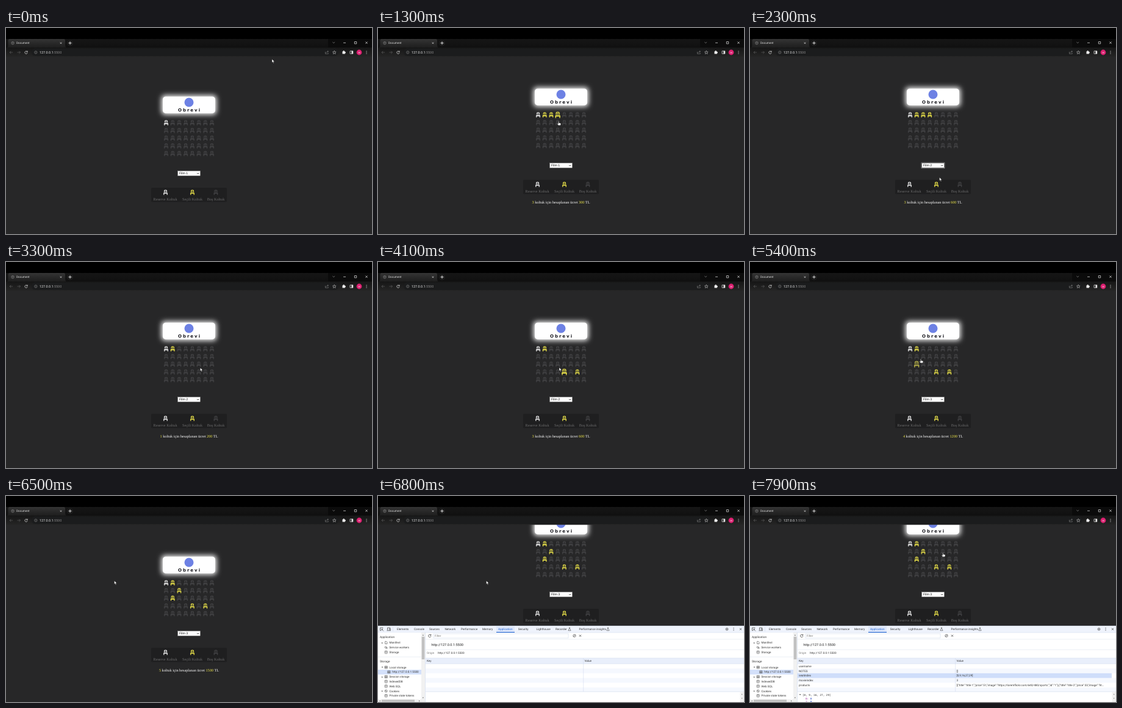
Animation, 600 px wide and 338 px high, one loop 8 s. Source, as an HTML page:

```html
<!DOCTYPE html>
<html lang="tr">
<head>
<meta charset="utf-8">
<title>Document</title>
<style>
  html, body { margin: 0; width: 100%; height: 100%; overflow: hidden; background: #272728; }
  svg { display: block; width: 600px; height: 338px; }
  text { font-family: Roboto, sans-serif; text-rendering: geometricPrecision; white-space: pre; }
  .serif { font-family: "Liberation Serif", serif; }
  .arial { font-family: "Liberation Sans", sans-serif; }
  .mono { font-family: "DejaVu Sans Mono", monospace; }
  .brand { font-family: "DejaVu Sans", sans-serif; font-weight: bold; letter-spacing: 2px; }
</style>
</head>
<body>
<svg id="stage" viewBox="0 0 600 338" xmlns="http://www.w3.org/2000/svg"></svg>
<script>
const LOOP = 8000, STEP = 100;
const DEVTOOLS = 6800, FILLED = 7000, PICKED = 7600, PREVIEW = 7700;
const DIM = [69, 69, 71], YELLOW = [240, 232, 75];
const BRIGHT = `rgb(${YELLOW})`;

// time, x, y of the pointer tip
const path = [
  [0, 436, 51], [300, 360, 112], [500, 278, 157], [600, 273, 155], [900, 284, 143],
  [1100, 294, 143], [1200, 294.5, 145], [1300, 296, 153], [1800, 312, 226],
  [2200, 311, 239], [2300, 310.5, 245], [2600, 294.5, 143], [2700, 294, 143],
  [2900, 284, 143], [3400, 327, 181], [3600, 326, 181], [3900, 305.5, 181],
  [4000, 304, 179], [4100, 297, 173], [4600, 312, 226], [5000, 311, 245],
  [5200, 274, 169], [5300, 274, 167], [5400, 280, 159], [5600, 284, 155],
  [5800, 284, 155], [6500, 177.5, 139], [6800, 177.5, 139], [7400, 355, 296],
  [7600, 357, 295], [7700, 350, 240], [7800, 325, 130], [7900, 316.3, 93], [8000, 316.3, 93]
];
// time, seat index
const clicks = [[600, 1], [900, 2], [1100, 3], [2700, 3], [2900, 2], [3400, 30], [3900, 28], [5300, 17], [5600, 10]];
const popups = [[1900, 2200], [4700, 5000]];
const focused = [[1800, 2700], [4600, 5300]];

const rect = (x, y, w, h, fill, more = '') =>
  `<rect x="${x}" y="${y}" width="${w}" height="${h}" fill="${fill}" ${more}/>`;
const text = (x, y, s, size, fill, more = '') =>
  `<text x="${x}" y="${y + size * 0.35}" font-size="${size}" fill="${fill}" ${more}>${s}</text>`;
const line = (d, color, width = 0.7) =>
  `<path d="${d}" fill="none" stroke="${color}" stroke-width="${width}"/>`;
const dot = (x, y, r, fill, more = '') => `<circle cx="${x}" cy="${y}" r="${r}" fill="${fill}" ${more}/>`;
const ring = (x, y, r, color) => dot(x, y, r, 'none', `stroke="${color}" stroke-width=".6"`);
const cross = (x, y, r, color) =>
  line(`M${x - r} ${y - r}l${2 * r} ${2 * r}m0 ${-2 * r}l${-2 * r} ${2 * r}`, color);
const kebab = (x, y, color) => [-2, 0, 2].map(d => dot(x, y + d, 0.6, color)).join('');
const reload = (x, y, color) =>
  line(`M${x + 1.8} ${y - 1.2}A2.2 2.2 0 1 0 ${x + 2.2} ${y + 0.6}M${x + 2.2} ${y - 2.6}v1.8h-1.8`, color);
const seat = (x, y, fill, more = '') =>
  `<use href="#chair" transform="translate(${x} ${y}) scale(.47)" fill="${fill}" ${more}/>`;

const seatX = i => 262.5 + (i % 8) * 10.72;
const seatY = i => 142.6 + Math.floor(i / 8) * 12.6;
const ids = Array.from({ length: 40 }, (_, i) => i);

function page() {
  return `<g id="page">
    ${rect(257, 99.4, 86, 27.6, '#fff', 'rx="5" filter="url(#glow)"')}
    ${rect(257, 99.4, 86, 27.6, '#fff', 'rx="5"')}
    ${dot(300, 109, 7.5, '#6d81e4')}
    ${text(301, 122, 'Obrevi', 7, '#16161c', 'class="brand" text-anchor="middle"')}
    ${ids.map(i => seat(seatX(i), seatY(i), '#f2f2f2', `id="s${i}"`)).join('')}
    ${rect(281.1, 221.1, 37.8, 8.8, 'none', 'id="focus" stroke="#fff" stroke-width=".6"')}
    ${rect(281.7, 221.7, 36.6, 7.6, '#fff', 'id="select" stroke-width=".4"')}
    ${text(284, 225.6, '', 5.2, '#111', 'class="arial" id="film"')}
    ${line('M313.2 224.8l1.5 1.6l1.5-1.6', '#111', 0.8)}
    ${rect(238, 249, 124, 23.5, '#1f1f20', 'rx="1.5"')}
    ${seat(261.5, 256.7, '#f2f2f2')}${seat(305.5, 256.7, BRIGHT)}${seat(344, 256.7, '#454547')}
    ${[[261, 'Reserve Koltuk'], [305.5, 'Seçili Koltuk'], [344, 'Boş Koltuk']].map(([x, s]) =>
      text(x, 267.4, s, 6.25, '#6c6c6d', 'class="serif" text-anchor="middle"')).join('')}
    ${text(300, 285.6, '', 6.25, '#fff', 'class="serif" text-anchor="middle" id="total"')}
    <g id="popup">
      ${rect(282, 229.3, 36.4, 26, '#fff', 'stroke="#777" stroke-width=".4"')}
      ${rect(282.2, 0, 36, 6.4, '#1e6fd9', 'id="option"')}
      ${[1, 2, 3, 4].map(n => text(284, 226.2 + n * 6.4, 'Film ' + n, 5.2, '#111', `class="arial" id="o${n}"`)).join('')}
    </g>
  </g>`;
}

function browser() {
  const g = '#8a8a8a', w = '#eee';
  return rect(0, 0, 600, 18, '#000') + rect(0, 18, 528, 14, 'url(#strip)') + rect(528, 18, 72, 14, '#0b0b0b')
    + `<path d="M2 32Q3.5 31 3.5 28V20.5Q3.5 18 6 18H95Q97 18 97 20.5V28Q97 31 99 32Z" fill="url(#tab)"/>`
    + rect(0, 32, 600, 15.3, 'url(#bar)')
    + rect(42, 33.5, 503, 12.5, '#1b1c1d', 'rx="6"')
    + ring(11, 24.7, 2.3, g) + line('M9 24.2h4M11 22.5v4.5', g, 0.4)
    + text(17, 24.7, 'Document', 4.7, '#e4e4e4') + cross(90, 24.7, 1.3, '#ddd')
    + dot(105, 24.7, 5, '#1c1c1c') + line('M102.5 24.7h5M105 22.2v5', w, 0.9)
    + line('M535.3 23l1.9 1.8l1.9-1.8', g) + line('M553 24.3h4', w)
    + line('M571.3 22.5h3.4v3.4h-3.4z', w) + cross(591, 24.2, 1.7, w)
    + line('M11 40h-5m2.2-2.2l-2.2 2.2l2.2 2.2M18.5 40h5m-2.2-2.2l2.2 2.2l-2.2 2.2', '#5c5c5c')
    + reload(33, 40, w) + ring(48.8, 40, 2.2, g) + line('M48.8 39.5v1.8M48.8 38.3v.6', g, 0.6)
    + text(55, 40, '127.0.0.1<tspan fill="#8c8c8c">:5500</tspan>', 5.45, w)
    + line('M523.5 39v3.3h4.8v-1.5M525 40.8q.5-2.3 3.3-2.3m-1.3-1.3l1.5 1.3l-1.5 1.3', g, 0.6)
    + line('M538.3 37.2l.8 1.9l2 .1l-1.5 1.4l.5 2l-1.8-1.1l-1.8 1.1l.5-2l-1.5-1.4l2-.1z', '#ccc', 0.6)
    + rect(551.5, 38.3, 4.4, 4.2, w) + dot(553.6, 38, 1, w) + dot(556, 40.3, 1, w)
    + line('M564 37.8h4.8v4.4h-4.8z', w) + rect(566.5, 37.8, 2.3, 4.4, w)
    + dot(579, 40, 4.4, '#dc1f70') + text(579, 40, 'H', 4.4, '#fff', 'text-anchor="middle"')
    + kebab(591, 40, w);
}

function sidebar() {
  const icon = (x, y, kind) => kind === 'db'
    ? line(`M${x - 2} ${y - 1.8}v3.6q2 1.3 4 0v-3.6q-2-1.3-4 0q2 1.3 4 0M${x - 2} ${y}q2 1.3 4 0`, '#444', 0.5)
    : kind === 'grid' ? line(`M${x - 2.2} ${y - 2}h4.4v4h-4.4zm0 1.5h4.4m-4.4 1.2h4.4m-2.2-2.7v4`, '#444', 0.5)
    : kind === 'file' ? line(`M${x - 1.5} ${y - 2}h2l1.3 1.3v2.7h-3.3z`, '#444', 0.6)
    : kind === 'gear' ? ring(x - 0.6, y - 0.3, 1.4, '#444') + ring(x + 1.2, y + 0.9, 0.9, '#444')
    : ring(x, y, 2, '#444') + dot(x - 0.5, y - 0.4, 0.5, '#444') + dot(x + 0.6, y + 0.6, 0.5, '#444');
  const rows = [
    [240.6, 'Manifest', 'file', '▶'], [248.5, 'Service workers', 'gear'], [256.4, 'Storage', 'db'],
    [281, 'Local storage', 'grid', '▼'], [288.8, 'http://127.0.0.1:5500', 'grid'],
    [296.6, 'Session storage', 'grid', '▶'], [304.4, 'IndexedDB', 'db'], [312.2, 'Web SQL', 'db'],
    [320, 'Cookies', 'cookie', '▶'], [327.8, 'Private state tokens', 'db']
  ];
  return rect(0, 224, 77, 114, '#fff') + rect(0, 285, 71, 7.8, '#d3e0fa')
    + line('M0 264h71', '#d5dcea', 0.5)
    + text(3, 231.3, 'Application', 4.8, '#333') + text(3, 271.6, 'Storage', 4.8, '#333')
    + rows.map(([y, s, kind, mark]) => {
      const x = s[0] === 'h' ? 23.2 : 18.5;
      return icon(x - 5.3, y, kind) + text(x, y, s, 4.65, '#333')
        + (mark ? text(6, y, mark, 3.4, '#444', 'class="mono"') : '');
    }).join('')
    + rect(71, 224, 6, 114, '#f1f1f1') + rect(71.7, 231, 4.6, 37, '#c1c1c1')
    + text(74, 227.7, '▲', 3, '#555', 'class="mono" text-anchor="middle"')
    + text(74, 330.5, '▼', 3, '#555', 'class="mono" text-anchor="middle"')
    + rect(0, 333.6, 77, 4.4, '#f1f1f1') + rect(6, 334.2, 54, 3.4, '#c1c1c1')
    + text(2, 336, '◀', 3, '#555', 'class="mono"') + text(67, 336, '▶', 3, '#555', 'class="mono"')
    + line('M77.5 224v114', '#cbd5ea', 0.6);
}

function devtools() {
  const tabs = [[31, 'Elements'], [59, 'Console'], [84, 'Sources'], [109.5, 'Network'], [136, 'Performance'],
    [171, 'Memory'], [197, 'Application'], [229.7, 'Security'], [259.5, 'Lighthouse'], [291, 'Recorder'],
    [329.5, 'Performance insights']];
  const flask = x => line(`M${x - 1} 216.2h2m-1.6 0v1.6l-1.5 3h4.2l-1.5-3v-1.6`, '#444', 0.6);
  const price = (n, p) => `{"title":"title ${n}","price":${p},"image":"`;
  const items = [['username', ''], ['NOTES', '[]'], ['seatindex', '[0,9,16,27,29]'], ['movieindex', '3'],
    ['products', `[${price(1, 51)}https://loremflickr.com/640/480/sports","id":"1"},${price(2, 33)}ht…`]];
  const rowY = i => 275.2 + i * 7.8;
  return `<g id="devtools">`
    + rect(0, 213, 600, 125, '#fff') + rect(0, 213, 600, 11, '#eff3fc')
    + line('M0 213.2h600M0 224h600', '#cbd5ea', 0.5)
    + line('M8 217v-.8h-4.5v4.5h1.5M6 218.5l3 3m-3-1v-2h2', '#333', 0.7)
    + line('M15.5 220v-3.8h4.8M14.5 220.8h3.4M18.5 217.7h2v3.2h-2z', '#333', 0.7)
    + line('M24.5 215v7', '#cbd5ea', 0.5)
    + rect(194, 213.3, 30, 10.7, '#dfe8fb') + rect(194, 223, 30, 1.1, '#1a5fd0')
    + tabs.map(([x, s]) => text(x, 218.5, s, 4.7, x === 197 ? '#1a5fd0' : '#333')).join('')
    + flask(314) + flask(377)
    + ring(572, 218.5, 2, '#333') + dot(572, 218.5, 0.8, '#333') + kebab(583, 218.5, '#333')
    + cross(594.5, 218.5, 1.6, '#333')
    + sidebar()
    + reload(84.7, 229.4, '#333') + rect(91, 226, 221, 7, '#fff', 'stroke="#cbd5ea" stroke-width=".5"')
    + text(93, 229.5, 'Filter', 4.6, '#777')
    + ring(322, 229.3, 2.2, '#333') + line('M320.5 230.8l3-3', '#333') + cross(331.5, 229.3, 1.6, '#333')
    + line('M78 235h522M78 252.2h522', '#d5dcea', 0.5)
    + text(87.5, 243.7, 'http://127.0.0.1:5500', 5.6, '#222')
    + text(80, 257.8, 'Origin', 4.65, '#777') + text(98, 257.8, 'http://127.0.0.1:5500', 4.65, '#333')
    + rect(78, 266, 522, 9.2, '#e9effb') + line('M78 266h522M78 275.2h522', '#cbd5ea', 0.5)
    + text(80, 270.7, 'Key', 4.65, '#333') + text(338.5, 270.7, 'Value', 4.65, '#333')
    + [1, 3, 5].map(i => rect(78, rowY(i), 522, i === 5 ? 6.5 : 7.8, '#f5f8fe')).join('')
    + `<g id="items">` + rect(78, rowY(2), 515, 7.8, '#cfdefa', 'id="picked"')
    + items.map(([k, v], i) => text(80, rowY(i) + 3.9, k, 4.65, '#333') + text(338.5, rowY(i) + 3.9, v, 4.65, '#333')).join('')
    + `</g>`
    + line('M336.7 266v55', '#cbd5ea', 0.5) + line('M78 321h522', '#cbd5ea', 0.6)
    + rect(593.5, 321.3, 6.5, 16.7, '#f1f1f1')
    + text(596.7, 324.5, '▲', 3, '#777', 'class="mono" text-anchor="middle"')
    + text(596.7, 332, '▼', 3, '#777', 'class="mono" text-anchor="middle"')
    + `<g id="preview">`
    + text(81, 326, '▼', 3.6, '#444', 'class="mono"') + text(86, 326, '[0, 9, 16, 27, 29]', 4.3, '#333', 'class="mono"')
    + [['0', 0], ['1', 9]].map(([k, v], i) =>
      text(91, 332.3 + i * 5.6, `${k}: <tspan fill="#1a3fc0">${v}</tspan>`, 4.3, '#9a2a9a', 'class="mono"')).join('')
    + `</g></g>`;
}

const fade = (id, top, bottom) =>
  `<linearGradient id="${id}" x2="0" y2="1"><stop stop-color="${top}"/><stop offset="1" stop-color="${bottom}"/></linearGradient>`;

const stage = document.getElementById('stage');
stage.innerHTML = `<defs>
  <filter id="glow" x="-30%" y="-80%" width="160%" height="260%">
    <feMorphology operator="dilate" radius="2"/><feGaussianBlur stdDeviation="4.2"/>
  </filter>
  ${fade('strip', '#161616', '#101010')}${fade('tab', '#343434', '#1e1e1e')}${fade('bar', '#161616', '#252525')}
  <path id="chair" d="M-5.7 0V-4.5Q-5.7 -9 -1.2 -9H1.2Q5.7 -9 5.7 -4.5V0H4V-4.5Q4 -6.2 2.6 -7V0H.9V-7.4H-.9V0H-2.6V-7Q-4 -6.2 -4 -4.5V0Z
    M-6.5 1.1H6.5L8 4.6H6.9V9H4.6V4.6H-4.6V9H-6.9V4.6H-8Z"/>
</defs>` + rect(0, 0, 600, 338, '#272728') + page() + browser() + devtools()
  + `<g id="pointer" stroke="#111" stroke-width="1.1" fill="#fff">
    <path id="arrow" d="M0 0V15L3.5 12L6 18L8.5 17L6 11H11Z"/>
    <path id="hand" d="M-1.5 1Q0 -1.5 1.5 1V7L9 8.5Q10.5 9 10 12L8.5 18H-1L-6 11Q-5 8.5 -1.5 12Z"/>
  </g>`;

const $ = id => document.getElementById(id);
const show = (id, on) => $(id).setAttribute('visibility', on ? 'visible' : 'hidden');
const within = (spans, t) => spans.some(([a, b]) => t >= a && t < b);
const picks = (i, t) => clicks.filter(c => c[1] === i && c[0] <= t);
const shift = t => t >= DEVTOOLS ? -64 : t < clicks[0][0] ? 13 : 0;
const filmAt = t => t < 2200 ? 1 : t < 5000 ? 2 : 3;

function tip(t) {
  const k = Math.max(1, path.findIndex(p => p[0] >= t));
  const [t0, x0, y0] = path[k - 1], [t1, x1, y1] = path[k];
  const f = Math.max(0, (t - t0) / (t1 - t0));
  return [x0 + (x1 - x0) * f, y0 + (y1 - y0) * f];
}

function hovered(t) {
  const [x, y] = tip(Math.max(0, t));
  const dy = shift(t);
  return ids.findIndex(i => i && Math.abs(x - seatX(i)) < 4.4 && Math.abs(y - seatY(i) - dy) < 4.5);
}

function draw(t) {
  const [x, y] = tip(t), big = hovered(t - STEP), film = filmAt(t);
  let count = 0;
  $('page').setAttribute('transform', `translate(0 ${shift(t)})`);

  for (const i of ids.slice(1)) {
    const done = picks(i, t), on = done.length % 2;
    count += on;
    const f = done.length ? Math.min(1, (t - done[done.length - 1][0]) / 150) : 1;
    const mix = on ? f : 1 - f;
    const color = DIM.map((c, k) => Math.round(c + (YELLOW[k] - c) * mix));
    $('s' + i).setAttribute('fill', `rgb(${color})`);
    $('s' + i).setAttribute('transform', `translate(${seatX(i)} ${seatY(i)}) scale(${i === big ? 0.58 : 0.47})`);
  }

  const focus = within(focused, t);
  $('film').textContent = 'Film ' + film;
  $('select').setAttribute('stroke', focus ? '#222' : '#aaa');
  show('focus', focus);
  $('total').innerHTML = count
    ? `<tspan fill="${BRIGHT}">${count}</tspan> koltuk için hesaplanan ücret <tspan fill="${BRIGHT}">${count * film * 100}</tspan> TL` : '';

  show('popup', within(popups, t));
  const pick = Math.max(1, Math.min(4, Math.ceil((y - 229.3) / 6.4)));
  $('option').setAttribute('y', 223 + pick * 6.4);
  for (let n = 1; n < 5; n++) $('o' + n).setAttribute('fill', n === pick ? '#fff' : '#111');

  show('devtools', t >= DEVTOOLS);
  show('items', t >= FILLED);
  show('picked', t >= PICKED);
  show('preview', t >= PREVIEW);
  // nested visible items must not leak out of the closed panel
  $('devtools').setAttribute('display', t >= DEVTOOLS ? 'inline' : 'none');

  const hand = hovered(t) > 0;
  show('hand', hand);
  show('arrow', !hand);
  $('pointer').setAttribute('transform', `translate(${x} ${y}) scale(.38)`);
}

function tick() {
  draw(Math.floor(performance.now() % LOOP / STEP) * STEP);
  requestAnimationFrame(tick);
}
tick();
</script>
</body>
</html>
```
